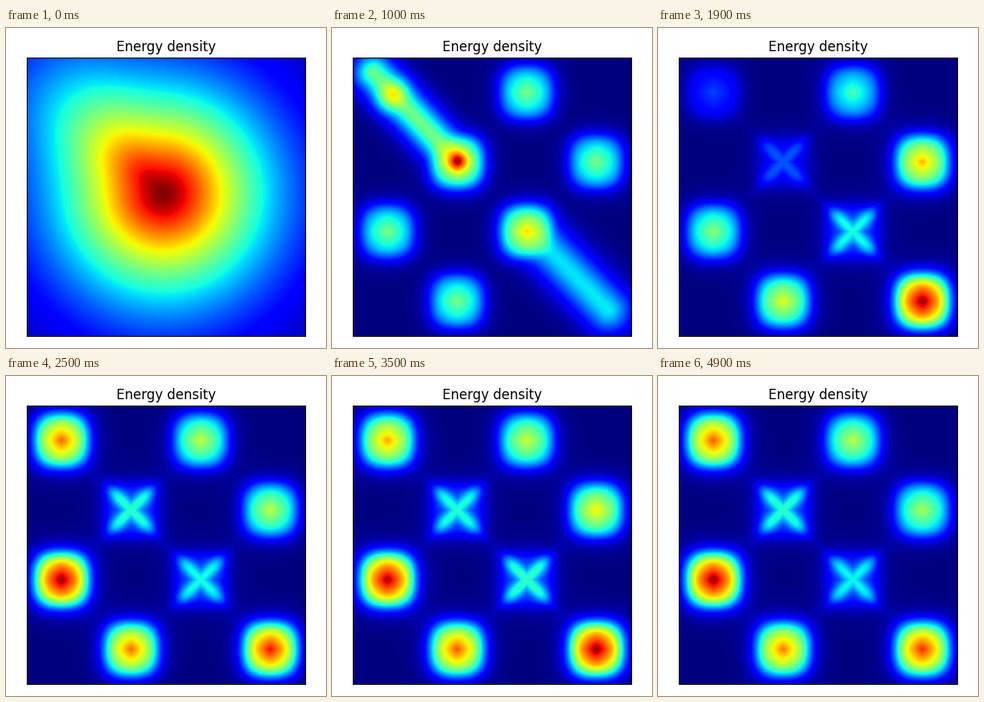
Animation of 400x400 px, one loop 5 s. Source, as a matplotlib script:

```python
import numpy as np
import matplotlib.pyplot as plt
from matplotlib.animation import FuncAnimation

STAGE, LEFT, TOP, SIDE = 400, 26, 37, 348
CELL = SIDE / 4
FRAMES, INTERVAL = 50, 100
STAR, SPLIT, SETTLED = 4, 10, 19  # frames at which each stage is reached

axis = np.arange(SIDE) + 0.5
X, Y = np.meshgrid(LEFT + axis, TOP + axis)

# Mean level and swing of each bright cell, by column and row
LEVELS = {
    (0, 0): (.65, -.45), (2, 0): (.52, -.06),
    (1, 1): (.34, -.12), (3, 1): (.56, .2),
    (0, 2): (.85, -.3), (2, 2): (.35, .05),
    (1, 3): (.71, -.05), (3, 3): (.85, .2),
}


def center(col, row):
    return LEFT + (col + 0.5) * CELL, TOP + (row + 0.5) * CELL


def offsets(col, row):
    x, y = center(col, row)
    return np.abs(X - x), np.abs(Y - y)


def norm(dx, dy, p):
    return (dx ** p + dy ** p) ** (1 / p)


def plateau(dx, dy, radius=35):
    """Rounded square that drops steeply at the cell's edge."""
    return 1 / (1 + (norm(dx, dy, 3) / radius) ** 6)


def peaked_cell(col, row):
    dx, dy = offsets(col, row)
    return plateau(dx, dy) * np.exp(-norm(dx, dy, 1.6) / 65)


def crossed_cell(col, row):
    dx, dy = offsets(col, row)
    return plateau(dx, dy, 34) * (.45 + .55 * np.exp(-((dx - dy) / 13) ** 2))


def spot(x, y, size, power=2):
    return np.exp(-(np.hypot(X - x, Y - y) / size) ** power)


def ridge(x0, y0, x1, y1, a0, a1, size, power=1.8):
    """Ridge along a segment whose height runs from a0 to a1."""
    dx, dy = x1 - x0, y1 - y0
    t = np.clip(((X - x0) * dx + (Y - y0) * dy) / (dx * dx + dy * dy), 0, 1)
    r = np.hypot(X - x0 - t * dx, Y - y0 - t * dy)
    return (a0 + (a1 - a0) * t) * np.exp(-(r / size) ** power)


def merge(parts, k=3):
    return sum(p ** k for p in parts) ** (1 / k)


def polar(x, y):
    return np.hypot(X - x, Y - y), np.arctan2(Y - y, X - x)


def mound():
    """One broad hill, stretched towards the upper left."""
    r, angle = polar(197, 207)
    turn = np.angle(np.exp(1j * (angle + np.radians(135))))
    reach = 125 + 42 * np.exp(-(turn / .45) ** 2)
    return np.exp(-(r / reach) ** 1.5)


def star():
    """Six-armed base with lobes and one hot ridge."""
    r, angle = polar(195, 225)
    turn = angle - np.pi / 4
    reach = 165 * (1 + .13 * np.cos(6 * turn)) * (1 + .12 * np.cos(2 * turn))
    return merge([
        .36 * np.exp(-(r / reach) ** 2.2),
        ridge(247, 248, 312, 320, 1, .93, 35, 1.4),
        ridge(335, 345, 374, 385, .6, .42, 38),
        ridge(245, 230, 322, 165, .46, .4, 40),
        .47 * spot(157, 173, 42),
        .56 * spot(164, 318, 46),
        .34 * spot(98, 260, 45),
        .22 * spot(235, 115, 45),
    ])


def split():
    """Separate cells, with ridges still crossing the diagonal ones."""
    middle = [.7 * peaked_cell(i, i) for i in (1, 2)]
    sides = [.53 * peaked_cell(*c) for c in LEVELS if c[0] != c[1]]
    return merge(middle + sides + [
        ridge(52, 56, 157, 167, .5, .52, 25),
        .6 * spot(76, 84, 24),
        .9 * spot(157, 166, 17, 1.4),
        ridge(250, 255, 345, 352, .36, .38, 30),
    ])


SHAPES = {(c, r): (crossed_cell if c == r and c in (1, 2) else peaked_cell)(c, r)
          for c, r in LEVELS}


def settled(frame):
    """Cells trading energy in a damped swing."""
    t = frame - SETTLED
    swing = np.exp(-t / 22) * np.cos(2 * np.pi * t / 21)
    return sum((mean + gain * swing) * SHAPES[cell]
               for cell, (mean, gain) in LEVELS.items())


STAGES = [(0, mound()), (STAR, star()), (SPLIT, split()),
          (SETTLED, settled(SETTLED))]


def density(frame):
    field = settled(frame)
    for (start, a), (end, b) in zip(STAGES, STAGES[1:]):
        if start <= frame < end:
            t = (frame - start) / (end - start)
            field = (1 - t) * a / a.max() + t * b / b.max()
    return field / field.max()


fig = plt.figure(figsize=(4, 4), dpi=100)
ax = fig.add_axes([LEFT / STAGE, 1 - (TOP + SIDE) / STAGE,
                   SIDE / STAGE, SIDE / STAGE])
ax.set_title("Energy density", fontfamily="DejaVu Sans", fontsize=12)
ax.set_xticks([])
ax.set_yticks([])
image = ax.imshow(density(0), cmap="jet", vmin=0, vmax=1, aspect="auto")


def update(frame):
    image.set_data(density(frame))
    return [image]


anim = FuncAnimation(fig, update, frames=FRAMES, interval=INTERVAL,
                     repeat=True, repeat_delay=0)
plt.show()
```
